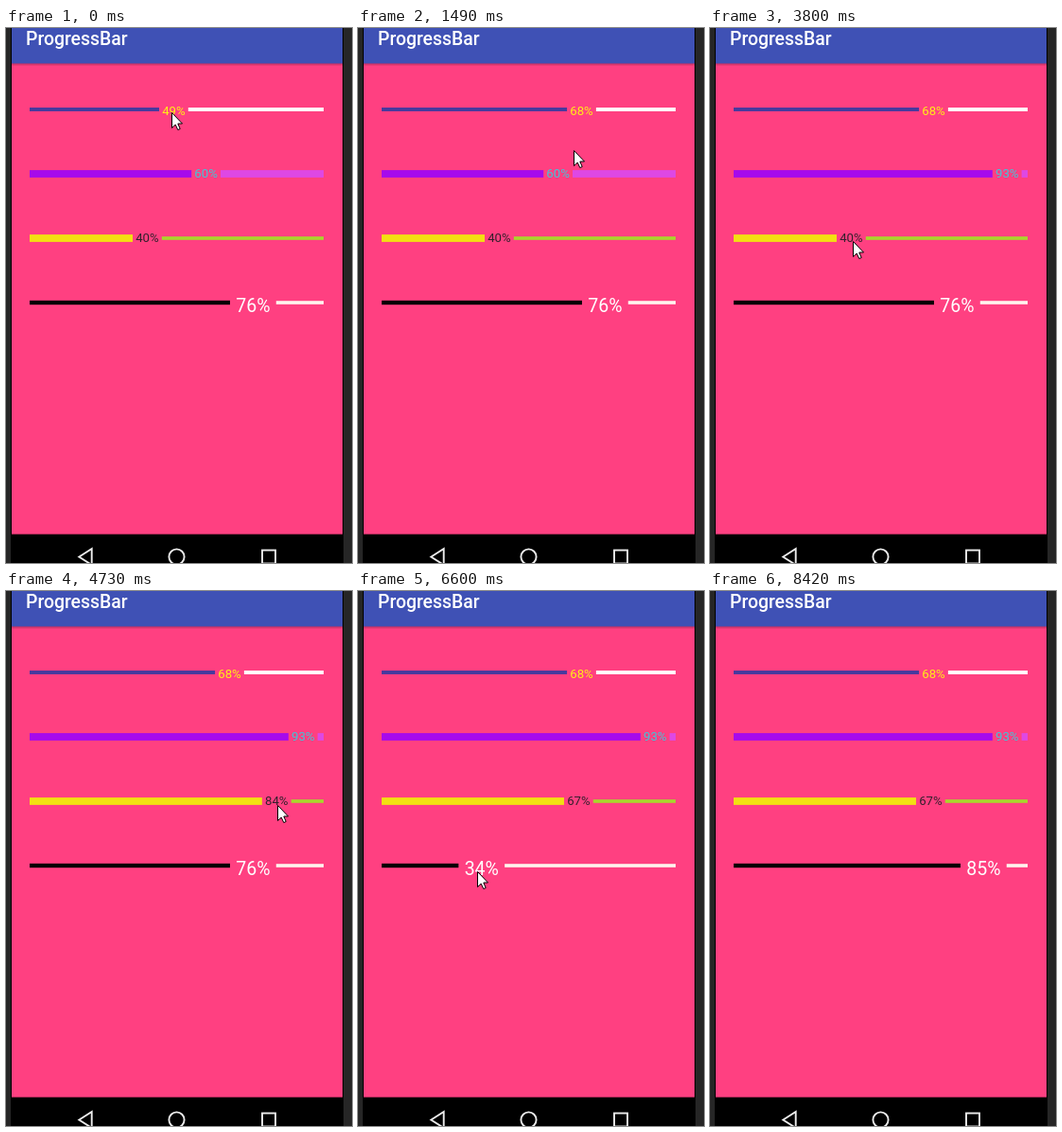
An HTML page for the animation above (8.85 s loop, 366 by 565 pixels).

```html
<!DOCTYPE html>
<html lang="en">
<head>
<meta charset="utf-8">
<title>ProgressBar</title>
<style>
  html, body { margin: 0; width: 100%; height: 100%; overflow: hidden; background: #262626; }
  svg { display: block; width: 366px; height: 565px; }
  text { font-family: Roboto, "Noto Sans", sans-serif; }
</style>
</head>
<body>
<svg viewBox="0 0 366 565" xmlns="http://www.w3.org/2000/svg">
  <defs>
    <linearGradient id="shade" x2="0" y2="1">
      <stop offset="0" stop-opacity=".25"/>
      <stop offset="1" stop-opacity="0"/>
    </linearGradient>
  </defs>
  <rect width="366" height="565" fill="#262626"/>
  <rect x="5" width="352" height="565"/>
  <rect x="6" width="350" height="534.6" fill="#ff4081"/>
  <rect x="6" width="350" height="37.5" fill="#3f51b5"/>
  <rect x="6" y="37.5" width="350" height="3" fill="url(#shade)"/>
  <text x="21" y="17.9" font-size="19.4" font-weight="500" fill="#fff">ProgressBar</text>
  <g fill="none" stroke="#ececec" stroke-width="1.9">
    <path d="M77.3 558.5L90.7 550V567Z"/>
    <circle cx="180.5" cy="558.5" r="8.1"/>
    <rect x="271" y="551.5" width="14" height="14"/>
  </g>
  <g id="bars"></g>
  <path id="cursor" d="M.5 .5V16.6L4.2 13.1 6.8 18.6 9.2 17.5 6.8 12H11.5Z"
        fill="#fff" stroke="#000" stroke-linejoin="round"/>
</svg>
<script>
const LOOP = 8850, STEP = 135.1, HIDE = 8420;
const LEFT = 25, WIDTH = 311, TOP = 86, PITCH = 68;
const LAG = 18;      // ms the bar trails the pointer
const SPEED = 0.3;   // px per ms between two bars
const EXIT = { x: 299, y: 471 };

// done, rest: height and colour; stops: time and percent under the pointer while dragging
const SMALL = { gap: 15.4, size: 13.2, sag: 0 };
const BARS = [
  { ...SMALL, pct: 49, done: [3.9, "#463a9e"], rest: [3.9, "#fff"], base: 91.8, ink: "#fff014",
    stops: [[0, 48.3], [560, 22], [1390, 68]] },
  { ...SMALL, pct: 60, done: [7.8, "#a60aec"], rest: [7.8, "#de48e4"], base: 157.8, ink: "#40c4d8",
    stops: [[1730, 60], [2650, 35], [3220, 93]] },
  { ...SMALL, pct: 40, done: [7.8, "#f3e012"], rest: [3.6, "#a8d62c"], base: 225.8, ink: "#33202c",
    sag: 3, stops: [[3940, 40], [4730, 84.4], [5280, 28], [5550, 67]] },
  { pct: 76, done: [4.4, "#000"], rest: [3.6, "#fff4ee"], base: 299.5, ink: "#fff",
    gap: 24.4, size: 19.5, sag: 14, stops: [[6090, 70.4], [6620, 25], [7751, 85]] }
];

const clamp = v => Math.min(1, Math.max(0, v));
const smooth = f => f * f * (3 - 2 * f);
const mix = (a, b, f) => a + (b - a) * f;
const toX = pct => LEFT + WIDTH * pct / 100;

function dragPct(stops, t) {
  let pct = stops[0][1];
  for (let i = 1; i < stops.length; i++) {
    const [from] = stops[i - 1], [to, goal] = stops[i];
    pct = mix(pct, goal, smooth(clamp((t - from) / (to - from))));
  }
  return pct;
}

function dragPoint(bar, t) {
  const f = clamp((t - bar.begin) / (bar.end - bar.begin));
  return { x: toX(dragPct(bar.stops, t)), y: bar.y + 3 + bar.sag * f };
}

function pointer(t) {
  const i = BARS.findLastIndex(b => t >= b.begin);
  const bar = BARS[i], a = dragPoint(bar, t);
  if (t <= bar.end) return a;
  const next = BARS[i + 1];
  const b = next ? dragPoint(next, next.begin) : EXIT;
  const f = clamp((t - bar.end) * SPEED / Math.hypot(b.x - a.x, b.y - a.y));
  return { x: mix(a.x, b.x, smooth(f)), y: mix(a.y, b.y, Math.sin(f * Math.PI / 2)) };
}

const barPct = (bar, t) =>
  t <= bar.begin ? bar.pct : Math.round(dragPct(bar.stops, t - LAG));

function set(el, attrs) {
  for (const k in attrs) el.setAttribute(k, attrs[k]);
}

const group = document.getElementById("bars");
const cursor = document.getElementById("cursor");

function add(tag, attrs) {
  const el = document.createElementNS("http://www.w3.org/2000/svg", tag);
  set(el, attrs);
  return group.appendChild(el);
}

BARS.forEach((bar, i) => {
  const line = ([height, fill]) =>
    add("rect", { x: LEFT, y: bar.y - height / 2, height, fill });
  bar.y = TOP + PITCH * i;
  bar.begin = bar.stops[0][0];
  bar.end = bar.stops[bar.stops.length - 1][0];
  bar.doneEl = line(bar.done);
  bar.restEl = line(bar.rest);
  bar.label = add("text", {
    y: bar.base, "font-size": bar.size, fill: bar.ink, "text-anchor": "middle"
  });
});

function draw(now) {
  const t = now % LOOP;
  const tick = Math.floor(t / STEP) * STEP;
  for (const bar of BARS) {
    const pct = barPct(bar, tick), mid = toX(pct);
    const restX = mid + bar.gap;
    set(bar.doneEl, { width: mid - bar.gap - LEFT });
    set(bar.restEl, { x: restX, width: LEFT + WIDTH - restX });
    set(bar.label, { x: mid });
    bar.label.textContent = pct + "%";
  }
  const p = pointer(tick);
  set(cursor, {
    transform: `translate(${Math.round(p.x)} ${Math.round(p.y)})`,
    visibility: t < HIDE ? "visible" : "hidden"
  });
}

const start = performance.now();
function loop() {
  draw(performance.now() - start);
  requestAnimationFrame(loop);
}
loop();
</script>
</body>
</html>
```
